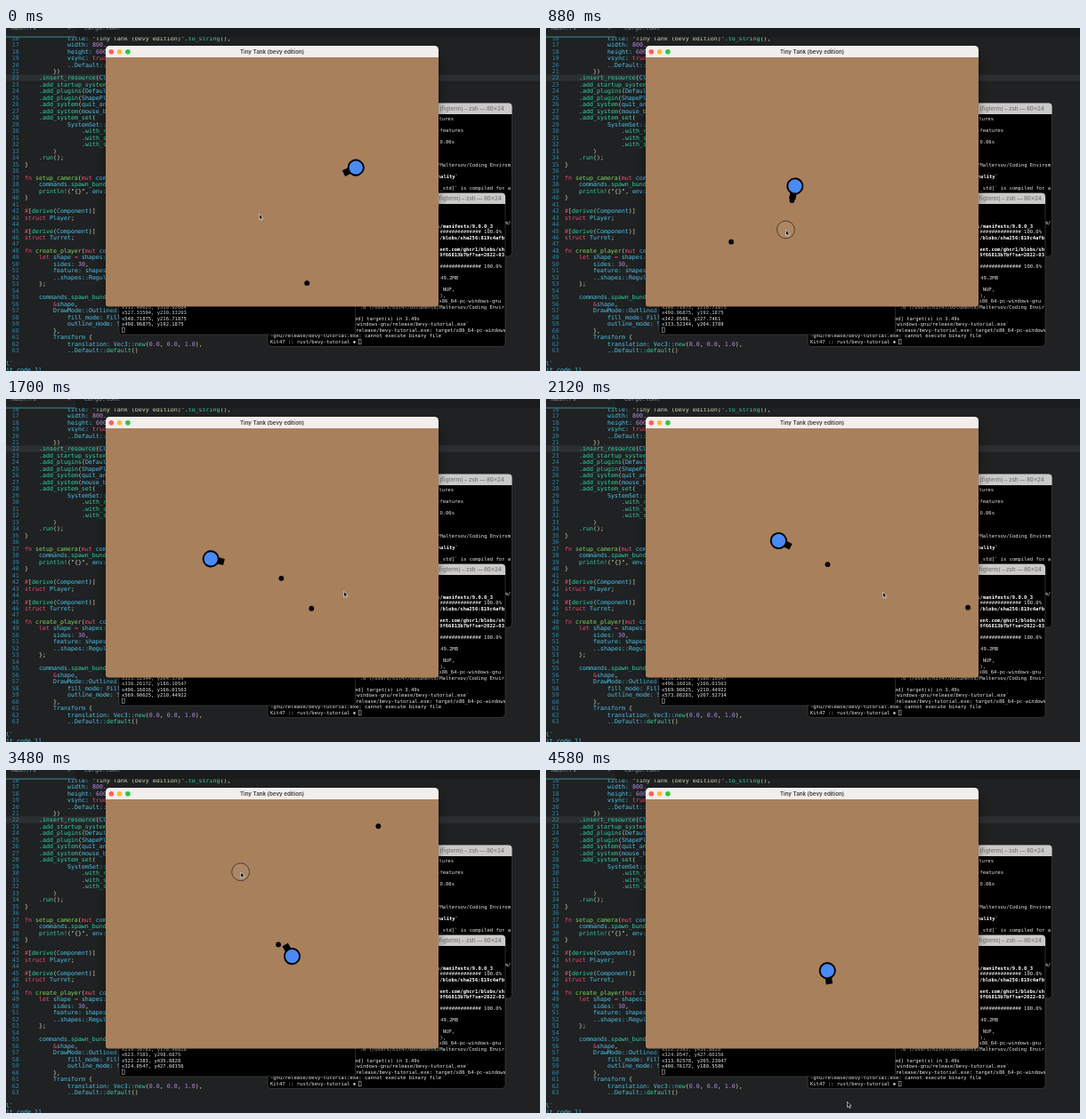
An HTML page for the animation above (4.61 s loop, 600x386 px).

```html
<!DOCTYPE html>
<html lang="en">
<head>
<meta charset="utf-8">
<title>Tiny Tank</title>
<style>
html, body { margin: 0; width: 100%; height: 100%; overflow: hidden; background: #1f2122; }
svg { display: block; width: 100vw; height: 100vh; }
text { white-space: pre; }
.code { font: 6.64px "DejaVu Sans Mono", monospace; fill: #4fc4ea; }
.num { fill: #2f86a6; text-anchor: end; }
.term { font: 5.5px "DejaVu Sans Mono", monospace; fill: #e6e6e6; }
.bold { font-weight: bold; fill: #fff; }
.title { font: 600 6.2px Inter, sans-serif; }
.kw { fill: #f5486f; } .fn { fill: #2fd8a0; } .def { fill: #86d85f; } .ty { fill: #4fc4ea; }
.no { fill: #b98be0; } .st { fill: #d3d6b4; } .dim { fill: #8b9294; }
.caret { fill: none; stroke: #bbb; stroke-width: .6; }
</style>
</head>
<body>
<svg viewBox="0 0 600 386" preserveAspectRatio="none">
  <defs>
    <clipPath id="field"><rect x="112" y="33" width="374" height="281"/></clipPath>
    <clipPath id="back"><rect x="300" y="85" width="268.5" height="172"/></clipPath>
    <clipPath id="front"><rect x="294" y="186" width="267" height="172.500"/></clipPath>
    <filter id="blur" x="-20%" y="-20%" width="140%" height="140%"><feGaussianBlur stdDeviation="6"/></filter>
  </defs>
  <rect width="600" height="386" fill="#1f2122"/>
  <rect y="52.300" width="600" height="7.500" fill="#2b2f31"/>
  <g id="editor"></g>
  <rect width="600" height="10.300" fill="#191b1c"/>
  <rect width="78" height="10.300" fill="#1f2122"/>
  <rect y="9.600" width="78" height="0.900" fill="#3f9aa0"/>
  <g id="tabs"></g>

  <rect x="300" y="84.500" width="268.5" height="172.500" rx="4" fill="#000" stroke="#4a4a4a" stroke-width=".6"/>
  <path d="M300 97V84.500H564.5a4 4 0 0 1 4 4V97Z" fill="#cbcac9"/>
  <text class="title" x="560" y="93.300" fill="#7d7c7b" text-anchor="end">(figterm) – zsh — 80×24</text>
  <g id="backText" clip-path="url(#back)"></g>

  <rect x="294" y="185.700" width="267" height="172.800" rx="4" fill="#000" stroke="#4a4a4a" stroke-width=".6"/>
  <path d="M294 198V185.700H557a4 4 0 0 1 4 4V198Z" fill="#cbcac9"/>
  <text class="title" x="557" y="194.300" fill="#7d7c7b" text-anchor="end">(figterm) – zsh — 80×24</text>
  <g id="frontText" clip-path="url(#front)"></g>
  <rect class="caret" x="396.300" y="350.200" width="2.700" height="5.600"/>

  <rect x="127" y="180" width="265.500" height="165" rx="3" fill="#000" stroke="#4a4a4a" stroke-width=".6"/>
  <g id="log"></g>
  <rect class="caret" x="130.500" y="337" width="2.700" height="5.600"/>

  <rect x="113" y="28" width="372" height="288" rx="5" fill="#000" opacity=".5" filter="url(#blur)"/>
  <path d="M112 33V24.500a4.500 4.500 0 0 1 4.500-4.500H481.500a4.500 4.500 0 0 1 4.500 4.500V33Z" fill="#f1eeec"/>
  <path d="M112 33H486V310.500a3 3 0 0 1-3 3H115a3 3 0 0 1-3-3Z" fill="#a8805c"/>
  <circle cx="118.300" cy="26.700" r="2.800" fill="#ff5f57"/>
  <circle cx="127.600" cy="26.700" r="2.800" fill="#febc2e"/>
  <circle cx="136.900" cy="26.700" r="2.800" fill="#28c840"/>
  <text class="title" x="299" y="29" fill="#3b3a39" text-anchor="middle">Tiny Tank (bevy edition)</text>

  <g clip-path="url(#field)">
    <g id="shots"></g>
    <g id="tank">
      <rect x="6" y="-3.700" width="9.200" height="7.400"/>
      <circle r="8.600" fill="#4a8af4" stroke="#000" stroke-width="1.900"/>
    </g>
  </g>
  <g id="cursor">
    <circle id="ring" cx=".4" r="9.900" fill="#fff" fill-opacity=".06" stroke="#222" stroke-width=".7"/>
    <path transform="translate(.5 .3)" d="M0 0V6.300L1.500 5 2.500 7.300 3.600 6.800 2.600 4.600H4.500Z" fill="#000" stroke="#fff" stroke-width=".6"/>
  </g>
</svg>
<script>
const LOOP = 4610, SPEED = 0.4, MUZZLE = 16, PRINT_DELAY = 9;
const $ = id => document.getElementById(id);

function add(parent, tag, attrs, text) {
  const el = document.createElementNS("http://www.w3.org/2000/svg", tag);
  for (const k in attrs) el.setAttribute(k, attrs[k]);
  if (text !== undefined) el.textContent = text;
  parent.appendChild(el);
  return el;
}

// Editor
const code = `            title: "Tiny Tank (bevy edition)".to_string(),
            width: 800.,
            height: 600.,
            vsync: true,
            ..Default::
        })
    .insert_resource(Cle
    .add_startup_system(
    .add_plugins(Default
    .add_plugin(ShapePlu
    .add_system(quit_and
    .add_system(mouse_bu
    .add_system_set(
            SystemSet::
                .with_run(
                .with_sys(
                .with_sys(
        )
    .run();
}

fn setup_camera(mut comm
    commands.spawn_bundle(
    println!("{}", env::
}

#[derive(Component)]
struct Player;

#[derive(Component)]
struct Turret;

fn create_player(mut com
    let shape = shapes::
        sides: 30,
        feature: shapes
        ..shapes::Regul
    };

    commands.spawn_bundle(
        &shape,
        DrawMode::Outlined {
            fill_mode: Fill
            outline_mode: S
        },
        Transform {
            translation: Vec3::new(0.0, 0.0, 1.0),
            ..Default::default()`.split("\n");
const token = /("[^"]*"?)|(\b(?:fn|mut|let|struct|true)\b|[#&=])|((?<=fn )\w+)|(\b[a-z_]+!?(?=\())|(\b\d[\d.]*)|(\b[A-Z]\w*)|([{}()\[\],;]+)/g;
const kinds = ["st", "kw", "def", "fn", "no", "ty", "st"];

function highlight(row, line) {
  let last = 0;
  for (const m of line.matchAll(token)) {
    add(row, "tspan", {}, line.slice(last, m.index));
    const kind = kinds[m.slice(1).findIndex(Boolean)];
    add(row, "tspan", { class: kind }, m[0]);
    last = m.index + m[0].length;
  }
  add(row, "tspan", {}, line.slice(last));
}

code.forEach((line, i) => {
  const y = 13.6 + i * 7.48;
  add($("editor"), "text", { class: "code num", x: 14.8, y }, i + 16);
  const indent = line.search(/\S|$/);
  highlight(add($("editor"), "text", { class: "code", x: 21 + indent * 4, y }), line.slice(indent));
});
[["l`", 379.5], ["it_code_1]", 386.7]]
  .forEach(([s, y]) => add($("editor"), "text", { class: "code", x: 0, y }, s));
[["main.rs", 6], ["×", 69], ["Cargo.toml", 88]]
  .forEach(([s, x]) => add($("tabs"), "text", { class: "code dim", x, y: 2.3 }, s));

// Terminal text: row centre, x, text, bold, right-aligned
function print(group, rows) {
  for (const [y, x, s, bold, end] of rows)
    add($(group), "text", {
      class: bold ? "term bold" : "term", x, y: y + 1.6, "text-anchor": end ? "end" : "start"
    }, s);
}
print("backText", [
  [102, 503, "tures", 0, 1], [115, 514, "-features", 0, 1], [128, 504, "0.06s", 0, 1],
  [154, 567, "/Maltersov/Coding Envirom", 0, 1], [167, 508, "nality`", 1, 1],
  [180, 567, "_std]` is compiled for a", 0, 1], [219, 567, "m/", 0, 1]
]);
const bar = "############## 100.0%";
print("frontText", [
  [223, 547, "s/manifests/9.0.0_3", 1, 1], [229.5, 557, bar, 0, 1],
  [236, 560, "/blobs/sha256:819c4afb", 1, 1], [249, 560, "ent.com/ghcr1/blobs/sh", 1, 1],
  [255.5, 560, "9f66813b7bf?se=2022-03", 1, 1], [268.5, 557, bar, 0, 1],
  [281.5, 508, "49.2MB", 0, 1], [294.5, 504, "NUP,", 0, 1], [301, 494, "),", 0, 1],
  [307.5, 556, "x86_64-pc-windows-gnu", 0, 1],
  [314, 560, ".0 (/Users/Kit47/Documents/Maltersov/Coding Envir", 0, 1],
  [327, 392, "ed] target(s) in 3.49s"],
  [333.5, 391, "-windows-gnu/release/bevy-tutorial.exe`"],
  [340, 393, "release/bevy-tutorial.exe: target/x86_64-pc-windows"],
  [346.5, 297, "-gnu/release/bevy-tutorial.exe: cannot execute binary file"],
  [353, 297, "Kit47 :: rust/bevy-tutorial ✱"]
]);

// Motion paths: time, x, y
const tankPath = [
  [-285, 345, 157], [0, 393.3, 157], [118, 380, 174], [390, 358.4, 208.5], [500, 340, 208.5],
  [880, 280, 178], [1330, 201.4, 154.4], [1475, 205, 181], [1700, 230, 180], [1910, 261.4, 159.5],
  [2940, 261.4, 159.5], [3120, 290, 159.5], [3480, 321.5, 209.6], [3800, 321, 222], [4000, 316.2, 225.8],
  [LOOP, 316.2, 225.8]
];
const cursorPath = [
  [-285, 341.5, 224], [0, 284, 209], [118, 272, 206.5], [390, 269.5, 209], [620, 268, 218.5],
  [880, 269, 227], [1260, 343.7, 236], [1335, 343.7, 236], [1475, 378.5, 215.6], [2008, 380, 217],
  [2120, 378, 217], [2255, 214.6, 231], [2700, 403.2, 177.7], [2790, 403.2, 177.7], [3120, 356, 110],
  [3450, 263.2, 114.7], [3500, 263.2, 114.7], [3800, 258.8, 190], [4000, 299.4, 229.6],
  [4560, 338, 373], [LOOP, 338, 373]
];
const linear = k => k, smooth = k => k * k * (3 - 2 * k);

function along(path, t, ease) {
  let i = 1;
  while (i < path.length - 1 && path[i][0] < t) i++;
  const [t0, x0, y0] = path[i - 1], [t1, x1, y1] = path[i];
  const k = ease((t - t0) / (t1 - t0));
  return [x0 + (x1 - x0) * k, y0 + (y1 - y0) * k];
}
const tankAt = t => along(tankPath, t, linear);
const cursorAt = t => along(cursorPath, t, smooth);

// Clicks: time, printed line, optional launch point
const shots = [
  [-285, "x490.96875, y192.1875"], [118, "x342.0586, y227.7461"], [620, "x333.52344, y204.3789"],
  [880, "x336.26172, y186.10547"], [1333, "x496.16016, y166.01563"], [1475, "x569.90625, y210.44922"],
  [2008, "x573.08203, y207.52734"], [2255, "x219.50781, y176.98828"], [2783, "x623.7383, y298.6875"],
  [3120, "x522.2383, y435.8828"], [3470, "x324.0547, y427.60156", [315.5, 214.5]],
  [3800, "x313.92578, y265.23047"], [4000, "x400.76172, y180.5586"]
].map(([time, line, from]) => {
  const [x, y] = from || tankAt(time), [ax, ay] = cursorAt(time);
  const d = Math.hypot(ax - x, ay - y);
  return { time, line, x, y, dx: (ax - x) / d, dy: (ay - y) / d, dot: add($("shots"), "circle", { r: 2.9 }) };
});
const earlier = ["x512.40625, y310.02664", "x527.33594, y230.33203", "x540.71875, y216.71875"];
const logRows = [314, 320.5, 327, 333.5].map(y => add($("log"), "text", { class: "term", x: 130, y: y + 1.8 }));

function draw(t) {
  const [x, y] = tankAt(t), [cx, cy] = cursorAt(t);
  const angle = Math.atan2(cy - y, cx - x) * 180 / Math.PI;
  $("tank").setAttribute("transform", `translate(${x} ${y}) rotate(${angle})`);
  $("cursor").setAttribute("transform", `translate(${cx} ${cy})`);
  const pressed = shots.some(s => t > s.time - 70 && t < s.time + 60);
  $("ring").setAttribute("visibility", pressed ? "visible" : "hidden");

  for (const s of shots) {
    const d = MUZZLE + SPEED * (t - s.time);
    s.dot.setAttribute("visibility", t >= s.time ? "visible" : "hidden");
    s.dot.setAttribute("cx", s.x + s.dx * d);
    s.dot.setAttribute("cy", s.y + s.dy * d);
  }
  const lines = earlier.concat(shots.filter(s => t >= s.time + PRINT_DELAY).map(s => s.line)).slice(-4);
  logRows.forEach((row, i) => { if (row.textContent !== lines[i]) row.textContent = lines[i]; });
}

const start = performance.now();
function tick() {
  draw((performance.now() - start) % LOOP);
  requestAnimationFrame(tick);
}
tick();
</script>
</body>
</html>
```
